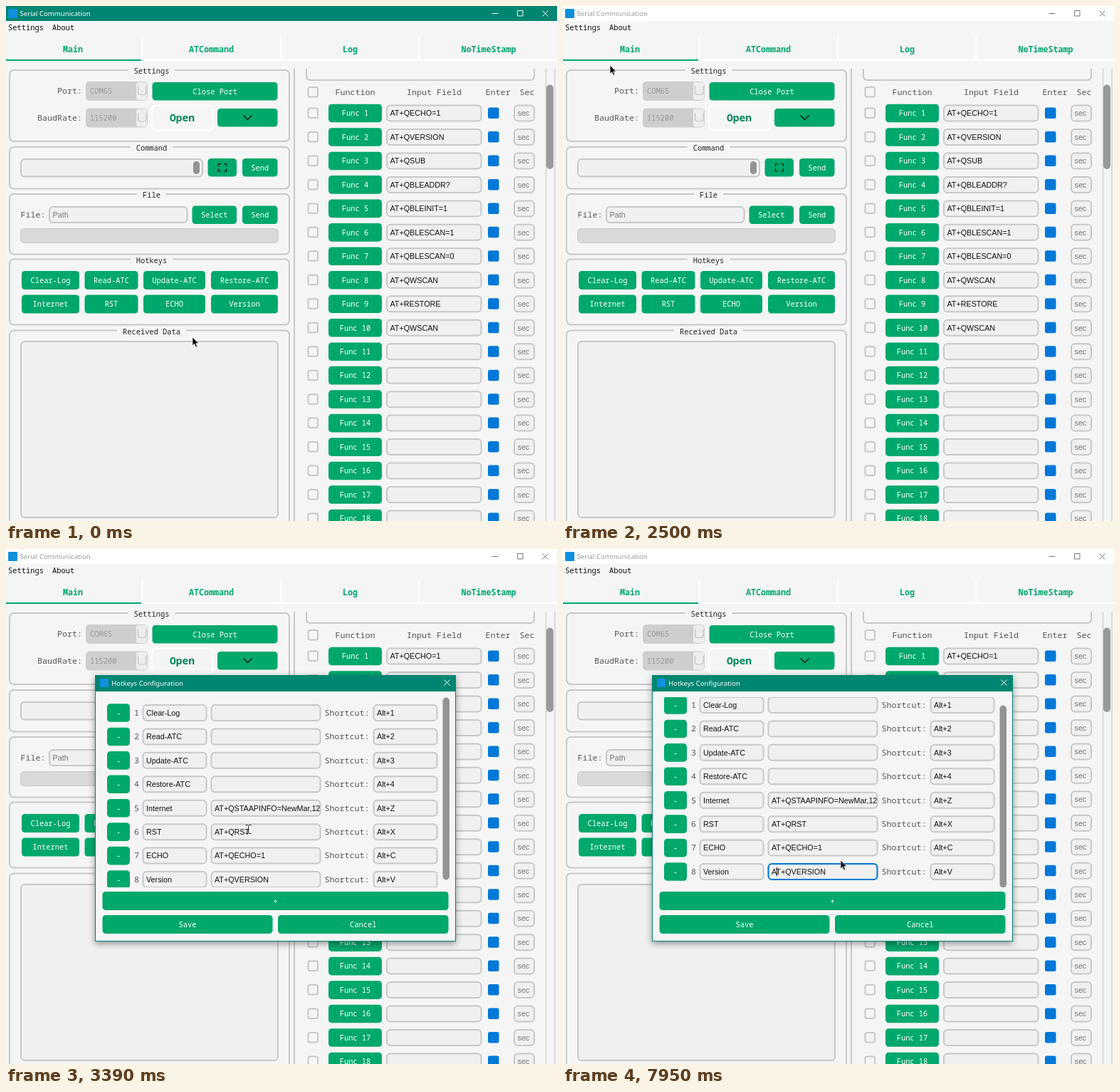
Recreate the animation shown at these times as an HTML page. Size 774x723 px, loop 8000 ms.

```html
<!DOCTYPE html>
<html lang="en">
<head>
<meta charset="utf-8">
<title>Serial Communication</title>
<style>
  html, body { margin: 0; width: 100%; height: 100%; overflow: hidden; background: #f5f5f5; }
  svg { display: block; width: 774px; height: 723px; }
  text { white-space: pre; }
  .mono { font: 10.4px "Noto Sans Mono", "DejaVu Sans Mono", monospace; }
  .label { font: 11.67px "Noto Sans Mono", "DejaVu Sans Mono", monospace; }
  .tab { font: bold 11.67px "Noto Sans Mono", "DejaVu Sans Mono", monospace; }
  .big { font: bold 14.6px "Noto Sans Mono", "DejaVu Sans Mono", monospace; }
  .input { font: 10.75px "Liberation Sans", Arial, sans-serif; }
  .title { font: 9.6px "Noto Sans", "Open Sans", sans-serif; }
</style>
</head>
<body>
<svg id="stage" viewBox="0 0 774 723" xmlns="http://www.w3.org/2000/svg"></svg>
<script>
const LOOP = 8000;
const GREEN = '#00a86b', TEAL = '#008570', BLUE = '#0078d7', BG = '#f5f5f5';
const LINE = '#c8c8c8', FIELD = '#f0f0f0', ICON = '#0f90dc';

// Shapes are given by their outer edges: left, top, right, bottom.
const box = (l, t, r, b, fill, rx = 0, extra = '') =>
  `<rect x="${l}" y="${t}" width="${r - l}" height="${b - t}" rx="${rx}" fill="${fill}" ${extra}/>`;
const frame = (l, t, r, b, fill = FIELD, rx = 5, stroke = LINE) =>
  box(l + 1, t + 1, r - 1, b - 1, fill, rx, `stroke="${stroke}" stroke-width="2"`);
const text = (x, cy, str, cls, fill, anchor = 'start', dy = 3.8) =>
  `<text x="${x}" y="${cy + dy}" class="${cls}" fill="${fill}" text-anchor="${anchor}">${str}</text>`;
const path = (d, stroke, width = 1, extra = '') =>
  `<path d="${d}" fill="none" stroke="${stroke}" stroke-width="${width}" ${extra}/>`;
const button = (l, t, r, b, str = '') =>
  box(l, t, r, b, GREEN, 4.5) + text((l + r) / 2, (t + b) / 2, str, 'mono', '#fff', 'middle');
const input = (l, r, cy, str = '', fill = '#111') =>
  frame(l, cy - 12, r, cy + 12) + text(l + 5.5, cy, str, 'input', fill);
const cross = (x, y, r) => `M${x - r} ${y - r}l${2 * r} ${2 * r}m0 ${-2 * r}l${-2 * r} ${2 * r}`;

function group(name, top, bottom) {
  const half = name.length * 3.125 + 8;
  return frame(4, top, 399, bottom, 'none', 6) +
    box(204.5 - half, top - 2, 204.5 + half, top + 6, BG) +
    text(204.5, top + 2.5, name, 'mono', '#222', 'middle');
}

function combo(cy, str) {
  return box(112, cy - 13.5, 199, cy + 13.5, '#cecece', 5) +
    box(183, cy - 12.5, 198, cy + 12.5, '#ededed', 3) +
    path(`M185.5 ${cy - 7}v8q0 4 4 4h3.500q4 0 4-4v-8`, '#c4c4c4', 1.2) +
    text(118, cy, str, 'mono', '#999');
}

function titleBar() {
  return `<rect id="bar" width="774" height="21"/>` + box(3, 4, 16, 17, ICON, 1) +
    `<g id="barInk">${text(19.5, 10.5, 'Serial Communication', 'title', 'currentColor', 'start', 3.5)}</g>` +
    `<g id="barIcons">${path('M682.5 10.5h9M718.500 6.500h7.500v7.500h-7.500z' + cross(757.5, 10.5, 4), 'currentColor')}</g>`;
}

function tabs() {
  return ['Main', 'ATCommand', 'Log', 'NoTimeStamp'].map((name, i) =>
    text([94, 288.5, 483.5, 678][i], 61, name, 'tab', GREEN, 'middle', 4)).join('') +
    path('M191.500 43v33M386 43v33M580 43v33M190 76h584', '#fff', 2.5) +
    box(0, 75, 190, 77, GREEN);
}

function leftPane() {
  const keys = ['Clear-Log', 'Read-ATC', 'Update-ATC', 'Restore-ATC', 'Internet', 'RST', 'ECHO', 'Version'];
  const cols = [[22, 103], [110.5, 185.5], [193, 280], [288, 382]];
  return group('Settings', 89, 191) +
    text(107, 119.5, 'Port:', 'label', '#555', 'end') + combo(119.5, 'COM65') +
    button(205.5, 107, 381.5, 132.5, 'Close Port') +
    text(107, 157, 'BaudRate:', 'label', '#555', 'end') + combo(157, '115200') +
    frame(204, 138.5, 291.5, 175.5, BG, 6, '#fff') +
    text(247.500, 157, 'Open', 'big', '#00875c', 'middle', 5.3) +
    button(297, 144, 381.5, 169.5) + path('M333.500 153.500l6 6 6-6', '#111', 1.3) +
    group('Command', 197, 257.5) + frame(20, 214, 277, 240.5) +
    box(263, 218, 272, 236, '#939393', 4.5) + button(283.5, 214, 324, 239.5) +
    path('M298.500 225v-3.500h3.500M306 221.500h3.500v3.500M309.500 228.500v3.500h-3.500M302 232h-3.500v-3.500', '#111', 1.2) +
    button(332, 214, 381.5, 239.5, 'Send') +
    group('File', 263, 349.5) + text(20.5, 293, 'File:', 'label', '#555') +
    input(60, 255.5, 293, 'Path', '#777') +
    button(261.5, 280.5, 324, 306, 'Select') + button(332, 280.5, 381.5, 306, 'Send') +
    box(20.5, 312.5, 382.5, 332.5, '#d9d9d9', 5, `stroke="${LINE}"`) +
    group('Hotkeys', 354.500, 448.5) +
    keys.map((key, i) => {
      const [l, r] = cols[i % 4], top = i < 4 ? 372 : 405.5;
      return button(l, top, r, top + 26, key);
    }).join('') +
    group('Received Data', 454.500, 740) + frame(20, 470, 383, 719);
}

function rightPane() {
  const commands = ['AT+QECHO=1', 'AT+QVERSION', 'AT+QSUB', 'AT+QBLEADDR?', 'AT+QBLEINIT=1',
    'AT+QBLESCAN=1', 'AT+QBLESCAN=0', 'AT+QWSCAN', 'AT+RESTORE', 'AT+QWSCAN'];
  const check = cy => frame(423.5, cy - 8, 439, cy + 7.5, BG, 2.5);
  let out = path('M405 88V723', LINE, 2) + path('M758.500 88V723M771 88V723', '#d2d2d2', 1.5) +
    path('M422 88v10q0 6 6 6h308q6 0 6-6v-10', LINE, 2) +
    box(759, 110.5, 769, 229, '#999', 5) + check(121) +
    text(490.5, 121, 'Function', 'label', '#555', 'middle') +
    text(601.5, 121, 'Input Field', 'label', '#555', 'middle') +
    text(691, 121, 'Enter', 'label', '#555', 'middle') +
    text(732, 121.5, 'Sec', 'label', '#555', 'middle');
  for (let i = 0; i < 18; i++) {
    const cy = 150.500 + 33.47 * i;
    out += check(cy) + button(453, cy - 12.800, 528, cy + 12.800, 'Func ' + (i + 1)) +
      input(534, 668.5, cy, commands[i]) + box(677, cy - 8, 692.500, cy + 7.500, BLUE, 2.500) +
      input(713, 743, cy, 'sec', '#777');
  }
  return out;
}

function menu() {
  const items = [['Save Config', 'S'], ['Layout Config', 'L'], ['Hotkeys Config', 'H']];
  return box(0.5, 41.5, 184, 97.5, '#f4f4f4', 0,
      'stroke="#c4c4c4" style="filter:drop-shadow(2px 2px 1.5px rgba(0,0,0,.55))"') +
    items.map(([name, key], i) => text(12, 50 + 18 * i, name, 'mono', '#111') +
      text(131.5, 50 + 18 * i, 'Ctrl+' + key, 'mono', '#111')).join('');
}

const HOTKEYS = [['Clear-Log', '', '1'], ['Read-ATC', '', '2'], ['Update-ATC', '', '3'],
  ['Restore-ATC', '', '4'], ['Internet', 'AT+QSTAAPINFO=NewMar,12', 'Z'], ['RST', 'AT+QRST', 'X'],
  ['ECHO', 'AT+QECHO=1', 'C'], ['Version', 'AT+QVERSION', 'V']];
const rowY = i => 230 + 33.43 * i;

function dialog() {
  const rows = HOTKEYS.map(([name, cmd, key], i) => {
    const cy = rowY(i);
    return button(142, cy - 12.800, 174, cy + 12.800, '-') + text(180, cy, i + 1, 'label', '#555') +
      input(191.5, 282.5, cy, name) +
      `<g clip-path="url(#cmdClip)">${input(287.5, 442.5, cy, cmd)}</g>` +
      text(447.5, cy, 'Shortcut:', 'label', '#555') + input(515.5, 606.5, cy, 'Alt+' + key);
  }).join('');
  return box(125, 177, 632, 551, BG, 0, 'style="filter:drop-shadow(0 3px 5px rgba(0,0,0,.4))"') +
    box(125.5, 177.5, 631.5, 550.5, BG, 0, `stroke="${TEAL}"`) + box(125, 177, 632, 200, TEAL) +
    box(132, 182, 144, 194, ICON) +
    text(148, 188, 'Hotkeys Configuration', 'title', '#fff', 'start', 3.5) +
    path(cross(619.5, 187.5, 4), '#fff') +
    `<g clip-path="url(#listClip)"><g id="list">${rows}` +
    frame(287.5, 0, 442.5, 24, 'none', 5, BLUE).replace('<rect', '<rect id="focus"') +
    `<path id="caret" d="M0-6v12" stroke="#111"/></g>` +
    `<rect id="thumb" x="613.5" width="9.5" height="256" rx="4.75" fill="#939393"/></g>` +
    button(135.5, 481, 621.5, 507, '+') + button(135.5, 514, 374.5, 540, 'Save') +
    button(382, 514, 621.5, 540, 'Cancel');
}

document.getElementById('stage').innerHTML =
  `<defs><clipPath id="listClip">${box(135, 208, 624, 475, '#000')}</clipPath>
   <clipPath id="cmdClip">${box(287, 190, 443, 490, '#000')}</clipPath></defs>` +
  box(0, 0, 774, 723, BG) + titleBar() +
  `<rect id="menuHot" y="22" width="59" height="17" fill="${BLUE}"/>` +
  text(3, 30.500, 'Settings', 'mono', 'currentColor').replace('<text', '<text id="menuName"') +
  text(65, 30.500, 'About', 'mono', '#111') +
  tabs() + leftPane() + rightPane() + `<g id="menu">${menu()}</g><g id="dialog">${dialog()}</g>` +
  `<path id="arrow" d="M0 0v11.800l2.700-2.500 2 4.600 1.900-.8-2-4.500h3.800z" fill="#000" stroke="#fff" stroke-width=".6"/>` +
  `<path id="beam" d="M-4-6h3l1 1 1-1h3M0-5v10M-4 6h3l1-1 1 1h3" fill="none" stroke="#222"/>`;

const el = Object.fromEntries([...document.querySelectorAll('[id]')].map(e => [e.id, e]));
const show = (e, on) => e.setAttribute('visibility', on ? 'visible' : 'hidden');

// Spans in which the pointer moves in discrete steps: start, end, step count.
const SPANS = [[390, 1160, 11], [1230, 1960, 9], [2290, 3040, 12], [3120, 3390, 5],
  [4710, 4990, 5], [5190, 5650, 6], [5850, 6130, 5], [6330, 6620, 5]];
// Pointer hotspot: time, x, y.
const POINTER = [[0, 262, 465], [320, 262, 465], [700, 195, 320], [1000, 72, 76], [1160, 45, 25],
  [1230, 45, 26], [1690, 50, 56], [1960, 57, 83], [2420, 60, 83], [2640, 78, 84], [2770, 115, 105],
  [2900, 195, 190], [3040, 304, 293], [3080, 304, 293], [3390, 340.5, 393.5], [4640, 340.5, 393.5],
  [4710, 340.5, 392.5], [4990, 340.5, 380.5], [5280, 340.5, 380.5], [5650, 378, 415.5],
  [5800, 378, 415.5], [6130, 388.5, 424.5], [6340, 388.5, 424.5], [6620, 390.5, 452.5],
  [7949, 390.5, 452.5], [7950, 390, 437], [8000, 390, 437]];
// Dialog opening: time, opacity, scale.
const OPENING = [[2565, .25, .95], [2635, .69, .986], [2700, .9, .996], [2767, .97, 1], [2840, 1, 1]];
// Focused command field: start, end, row.
const FOCUS = [[5190, 6130, 5], [6330, 6890, 6], [7020, LOOP, 7]];

function stepTime(t) {
  const span = SPANS.find(([a, b]) => t >= a && t < b);
  if (!span) return t;
  const [a, b, n] = span, step = (b - a) / (n - 1);
  return a + Math.floor((t - a) / step) * step;
}

function sample(keys, t) {
  const i = keys.findIndex(k => k[0] > t);
  if (i < 0) return keys.at(-1).slice(1);
  if (i === 0) return keys[0].slice(1);
  const a = keys[i - 1], b = keys[i], p = (t - a[0]) / (b[0] - a[0]);
  return a.slice(1).map((v, j) => v + (b[j + 1] - v) * p);
}

function render(t) {
  const ts = stepTime(t), active = t < 2500;
  const hot = t >= 1085 && t < 2290;
  el.bar.setAttribute('fill', active ? TEAL : '#fff');
  el.barInk.setAttribute('color', active ? '#fff' : '#999');
  el.barIcons.setAttribute('color', active ? '#fff' : '#777');
  show(el.menuHot, hot);
  el.menuName.setAttribute('color', hot ? '#fff' : '#111');
  show(el.menu, t >= 1230 && t < 2290);

  const [alpha, scale] = sample(OPENING, ts);
  const open = t >= 2560;
  el.dialog.setAttribute('display', open ? 'inline' : 'none');
  el.dialog.setAttribute('opacity', alpha);
  el.dialog.setAttribute('transform', `translate(378.5 364) scale(${scale}) translate(-378.5 -364)`);

  const scroll = t >= 3720 ? 11 : 0;
  el.list.setAttribute('transform', `translate(0 ${-scroll})`);
  el.thumb.setAttribute('y', 208.5 + scroll);

  const focus = FOCUS.find(([a, b]) => t >= a && t < b);
  show(el.focus, focus);
  show(el.caret, focus && !(t >= 7420 && t < 7950));
  if (focus) {
    const cy = rowY(focus[2]), width = caretX[focus[2]];
    el.focus.setAttribute('y', cy - 11);
    el.caret.setAttribute('transform', `translate(${width} ${cy})`);
  }

  const [x, y] = sample(POINTER, ts);
  const overField = t >= 2840 && x > 288 && x < 443 &&
    HOTKEYS.some((_, i) => Math.abs(y - rowY(i) + scroll) < 12);
  show(el.arrow, !overField);
  show(el.beam, overField);
  (overField ? el.beam : el.arrow).setAttribute('transform', `translate(${x} ${y})`);
}

const caretX = [...el.list.querySelectorAll('g text')].map(e =>
  Math.round(293 + e.getComputedTextLength()) + .5);

const start = performance.now();
function tick() {
  render((performance.now() - start) % LOOP);
  requestAnimationFrame(tick);
}
tick();
</script>
</body>
</html>
```
